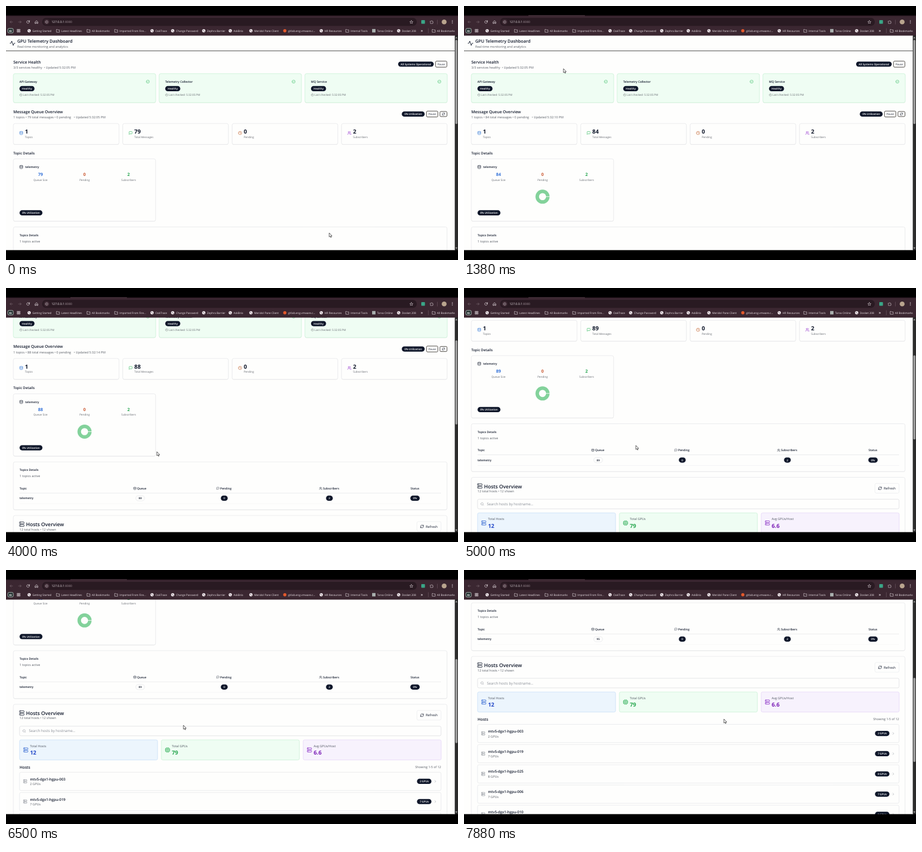
These frames come from a looping animation (800x450 px, 8 s). An HTML page with a canvas:

```html
<!DOCTYPE html>
<html lang="en">
<head>
<meta charset="utf-8">
<title>GPU Telemetry Dashboard</title>
<style>
html, body { margin: 0; width: 100%; height: 100%; overflow: hidden; background: #000; }
canvas { display: block; width: 800px; height: 450px; }
</style>
</head>
<body>
<canvas id="stage"></canvas>
<script>
const LOOP = 8000, STEP = 125;
const INK = '#0f172a', GRAY = '#64686f', LINE = '#e3e4e7', PAGE = '#fefefd';
const BLUE = '#3b7dd8', GREEN = '#2fb95c', ORANGE = '#c2622d', PURPLE = '#9a3fd0';
const SM = 5.56, XS = 4.77, PILL = 4.7, HEAD = 7.05, ITEM = 5.2;

const canvas = document.getElementById('stage');
const ctx = canvas.getContext('2d');
const dpr = window.devicePixelRatio || 1;
canvas.width = 800 * dpr;
canvas.height = 450 * dpr;

// Icons on a 24 unit grid
const slab = y => `M4 ${y}h16a2 2 0 0 1 2 2v4a2 2 0 0 1-2 2H4a2 2 0 0 1-2-2V${y + 2}a2 2 0 0 1 2-2zM6 ${y + 4}h1`;
const ring = 'M2 12a10 10 0 1 0 20 0a10 10 0 1 0-20 0';
const icons = {
  activity: 'M23 12h-4l-4 10L9 2l-4 10H1',
  database: 'M3 5a9 3 0 0 0 18 0a9 3 0 0 0-18 0V19a9 3 0 0 0 18 0V5M3 12a9 3 0 0 0 18 0',
  message: 'M21 15a2 2 0 0 1-2 2H7l-4 4V5a2 2 0 0 1 2-2h14a2 2 0 0 1 2 2z',
  clock: ring + 'M12 6v6l4 2',
  users: 'M16 21v-2a4 4 0 0 0-4-4H6a4 4 0 0 0-4 4v2M5 7a4 4 0 1 0 8 0a4 4 0 1 0-8 0M22 21v-2a4 4 0 0 0-3-3.9M16 3.1a4 4 0 0 1 0 7.8',
  check: ring + 'M8 12l3 3l5-6',
  server: slab(2) + slab(14),
  refresh: 'M3 12a9 9 0 0 1 9-9a9.7 9.7 0 0 1 6.7 2.7L21 8M21 3v5h-5M21 12a9 9 0 0 1-9 9a9.7 9.7 0 0 1-6.7-2.7L3 16M8 16H3v5',
  cpu: 'M4 4h16v16H4zM9 9h6v6H9zM9 1v3M15 1v3M9 20v3M15 20v3M1 9h3M1 15h3M20 9h3M20 15h3',
  search: 'M3 11a8 8 0 1 0 16 0a8 8 0 1 0-16 0M21 21l-4.3-4.3',
  chevron: 'M9 18l6-6l-6-6',
  folder: 'M2 20V4h7l3 3h10v13z',
  grid: 'M3 3h7v7H3zM14 3h7v7h-7zM3 14h7v7H3zM14 14h7v7h-7z',
  back: 'M20 12H4M11 5l-7 7l7 7',
  forward: 'M4 12h16M13 5l7 7l-7 7',
  reload: 'M20 12a8 8 0 1 1-2.5-5.8L21 9M21 3v6h-6',
  home: 'M4 11l8-7l8 7v10h-5v-6H9v6H4z',
  info: ring + 'M12 11v6M12 7v1',
  star: 'M12 2l3 7l7.5.6l-5.7 5l1.8 7.4L12 18l-6.6 4l1.8-7.4l-5.7-5L9 9z',
  puzzle: 'M3 7h6a3 3 0 1 1 6 0h4v5a3 3 0 1 1 0 6v4H3v-5a3 3 0 0 0 0-5z'
};
for (const k in icons) icons[k] = new Path2D(icons[k]);

function icon(name, x, y, size, color, weight = 2) {
  ctx.save();
  ctx.translate(x - size / 2, y - size / 2);
  ctx.scale(size / 24, size / 24);
  ctx.lineWidth = weight;
  ctx.lineCap = ctx.lineJoin = 'round';
  ctx.strokeStyle = color;
  ctx.stroke(icons[name]);
  ctx.restore();
}

// y is the middle of the capitals
function text(s, x, y, size, color = INK, weight = 400, align = 'left') {
  ctx.font = `${weight} ${size}px "Open Sans", "Noto Sans", sans-serif`;
  ctx.textAlign = align;
  ctx.fillStyle = color;
  ctx.fillText(s, x, y + size * 0.357);
}

function rect(x, y, w, h, color) {
  ctx.fillStyle = color;
  ctx.fillRect(x, y, w, h);
}

function box(x0, y0, x1, y1, r, fill, stroke, width = 0.7) {
  ctx.beginPath();
  ctx.roundRect(x0, y0, x1 - x0, y1 - y0, r);
  if (fill) { ctx.fillStyle = fill; ctx.fill(); }
  if (stroke) { ctx.strokeStyle = stroke; ctx.lineWidth = width; ctx.stroke(); }
}

function dot(x, y, r, color) {
  ctx.beginPath();
  ctx.arc(x, y, r, 0, 7);
  ctx.fillStyle = color;
  ctx.fill();
}

function card(x0, y0, x1, y1, fill = PAGE, stroke = LINE) {
  box(x0, y0 + 0.7, x1, y1 + 0.7, 3, 'rgba(0,0,0,.07)');
  box(x0, y0, x1, y1, 3, fill, stroke);
}

function pill(s, x0, x1, y) {
  box(x0, y - 4.6, x1, y + 4.6, 4.6, INK);
  text(s, (x0 + x1) / 2, y, PILL, '#fff', 600, 'center');
}

function button(x0, x1, y, h, label) {
  box(x0, y - h / 2, x1, y + h / 2, 1.8, PAGE, '#39352f', 0.9);
  if (label) text(label, (x0 + x1) / 2, y, 4.6, INK, 500, 'center');
}

// Timeline
const clamp = v => Math.max(0, Math.min(1, v));
const easeOut = p => 1 - (1 - p) ** 3;
const easeInOut = p => p * p * (3 - 2 * p);

const wheelTicks = [3600, 3800, 4450, 4950, 5400, 6380, 7200, 7480];
const scrollAt = t => wheelTicks.reduce((s, k) => s + easeOut(clamp((t - k) / 180)) * 125 / 3, 0);

const polls = [[0, 79, '05'], [900, 84, '10'], [2960, 88, '14'], [4300, 89, '15'], [7500, 95, '20']];
const pollAt = t => polls.filter(p => p[0] <= t).pop();

const path = [
  [130, 572, 402], [1150, 176, 111], [1600, 176, 111], [2550, 775, 191], [2980, 775, 191],
  [3560, 267, 290], [4100, 267, 290], [4900, 304, 279], [5750, 308, 276], [6500, 314, 275],
  [6900, 316, 275], [7800, 460, 264]
];
function pointerAt(t) {
  const i = path.findIndex(k => k[0] > t);
  if (i < 0) return path[path.length - 1].slice(1);
  if (i === 0) return path[0].slice(1);
  const [a, x0, y0] = path[i - 1], [b, x1, y1] = path[i];
  const p = easeInOut((t - a) / (b - a));
  return [x0 + (x1 - x0) * p, y0 + (y1 - y0) * p];
}

// Browser frame
const bookmarks = [
  [41, 'globe', 'Getting Started'], [92, 'folder', 'Latest Headlines'], [146, 'folder', 'All Bookmarks'],
  [195, 'folder', 'Imported From Fire...'], [258.5, 'globe', 'OakTrace'], [295, 'globe', 'Change Password'],
  [350, 'globe', 'Zephra Barrier'], [397, 'globe', 'AskBrio'], [433.5, 'globe', 'Meridol Pane Client'],
  [493.5, '#e2592c', 'gitlab.eng.vmware.c...'], [558, 'globe', 'HR Resources'], [604, 'folder', 'Internal Tools'],
  [651, '#a9b0ae', 'Tarva Online'], [695, 'globe', 'Dosket 208'], [757, 'folder', 'All Bookmarks']
];

function drawBrowser(t, scroll) {
  const light = '#eee6ea', dim = '#84727b';
  rect(0, 0, 800, 17, '#000');
  rect(0, 432.5, 800, 18, '#000');
  rect(0, 17, 800, 35.5, '#3b2731');
  rect(0, 16.5, 800, 1.2, '#21121a');
  if (t >= STEP) rect(114, 16.5, 100, 1, '#5b424e');
  box(64, 21, 727, 35.3, 7, '#291a22');
  icon('back', 9.5, 28.3, 7, dim);
  icon('forward', 24.5, 28.3, 7, dim);
  icon('reload', 39, 28.3, 7, light, 2.4);
  icon('home', 54, 28.3, 7, light, 2.4);
  dot(72, 28.3, 5, '#3b2731');
  icon('info', 72, 28.3, 5.6, light);
  text('127.0.0.1', 80.5, 28.3, 5.4, light);
  text(':8080', 80.5 + ctx.measureText('127.0.0.1').width, 28.3, 5.4, '#9d8d95');
  icon('star', 717.5, 28.3, 6.5, light);
  box(735, 25, 741.5, 31.5, 1, '#3aa587');
  icon('puzzle', 753.5, 28.3, 6.5, light);
  rect(763.3, 24.5, 0.7, 8, '#6a5560');
  dot(775.5, 28.3, 4.3, '#b9a48e');
  for (const d of [-2.3, 0, 2.3]) dot(790, 28.3 + d, 0.7, light);

  box(3.3, 39.7, 12.8, 47.8, 2, '#22302f', '#c9d6d2', 0.8);
  text('AI', 8, 43.8, 4.8, '#fff', 700, 'center');
  icon('grid', 22.5, 43.8, 6.5, light, 2.6);
  for (const [x, kind, label] of bookmarks) {
    if (kind === 'folder') icon('folder', x, 43.8, 6.6, light, 2.2);
    else if (kind === 'globe') {
      dot(x, 43.8, 2.9, '#f2ecef');
      rect(x - 1.4, 42.6, 1.5, 1.2, '#6b5561');
      rect(x + 0.3, 44.2, 1.2, 1.2, '#6b5561');
    } else if (x > 600) box(x - 3, 40.8, x + 3, 46.8, 0, kind);
    else dot(x, 43.8, 2.9, kind);
    text(label, x + 5.8, 43.8, XS, light);
  }
  text('»', 736, 43.4, 7, light, 600, 'center');
  rect(747, 39.5, 0.7, 8.5, '#6a5560');

  rect(794.3, 52.5, 5.7, 380, '#2c2c2c');
  box(795.3, 60 + scroll * 0.393, 799, 209 + scroll * 0.393, 1.9, '#9c9c9c');
  for (const [y, d] of [[57.3, -2.5], [427.8, 2.5]]) {
    ctx.beginPath();
    ctx.moveTo(795.2, y);
    ctx.lineTo(799, y);
    ctx.lineTo(797.1, y + d);
    ctx.fillStyle = '#a5a5a5';
    ctx.fill();
  }
}

// Page sections
function drawHealth() {
  icon('activity', 11.5, 66, 9.6, INK, 2.3);
  text('GPU Telemetry Dashboard', 20, 62.2, 7.7, INK, 600);
  text('Real-time monitoring and analytics', 20, 72, SM, '#555a63');
  rect(0, 79, 794.3, 0.9, '#3a3a3a');

  text('Service Health', 13, 99, HEAD, INK, 600);
  text('3/3 services healthy', 13, 108.8, SM, '#555a63');
  text('• Updated 5:32:05 PM', 67, 108.8, SM, '#555a63');
  pill('All Systems Operational', 694, 757, 103);
  button(760.3, 780.3, 103, 10.6, 'Pause');
  ['API Gateway', 'Telemetry Collector', 'MQ Service'].forEach((name, i) => {
    const x = 13 + i * 258;
    card(x, 119.8, x + 252, 171.2, '#effdf3', '#c3efd1');
    text(name, x + 10.8, 134, ITEM, INK, 600);
    icon('check', x + 238, 134, 6.6, GREEN);
    pill('Healthy', x + 10.8, x + 37.5, 146.4);
    icon('clock', x + 13.3, 157.6, 5, GRAY);
    text('Last checked: 5:32:05 PM', x + 17, 157.6, XS, GRAY);
  });
}

function drawQueue(t, count, sec) {
  text('Message Queue Overview', 13, 187.3, HEAD, INK, 600);
  text(`1 topics • ${count} total messages • 0 pending`, 13, 197.2, SM, '#555a63');
  text(`• Updated 5:32:${sec} PM`, 120, 197.2, SM, '#555a63');
  const loading = t >= 2650 && t < 2960;
  if (loading) pill('Loading...', 710, 741, 191.4);
  else pill('0% Utilization', 700.5, 741, 191.4);
  button(744.3, 764.3, 191.4, 10.4, 'Pause');
  ctx.globalAlpha = loading ? 0.45 : 1;
  button(768, 780.5, 191.4, 9);
  icon('refresh', 774.2, 191.4, 5.4, INK, 2.4);
  ctx.globalAlpha = 1;

  const stats = [
    ['database', BLUE, 1, 'Topics'], ['message', GREEN, count, 'Total Messages'],
    ['clock', ORANGE, 0, 'Pending'], ['users', PURPLE, 2, 'Subscribers']
  ];
  stats.forEach(([name, color, value, label], i) => {
    const x = 13 + i * 193.6;
    card(x, 208.2, x + 187, 245.2);
    icon(name, x + 14, 225, 7, color, 2.2);
    text(value, x + 20.5, 222.6, 10, INK, 700);
    text(label, x + 20.5, 232, XS, GRAY);
  });
}

function drawTopic(t, count) {
  text('Topic Details', 13, 260.6, 6.2, INK, 600);
  card(13, 270.8, 264.8, 381.2);
  icon('database', 27, 285.2, 7, INK);
  text('telemetry', 34, 285.2, ITEM, INK, 600);
  [[count, '#3573d9', 'Queue Size'], [0, '#cb5a33', 'Pending'], [2, '#27a650', 'Subscribers']].forEach(([v, color, label], i) => {
    const x = 61 + i * 78;
    text(v, x, 298.7, 7.6, color, 700, 'center');
    text(label, x, 307.8, XS, GRAY, 400, 'center');
  });
  const sweep = easeInOut(clamp((t - 250) / 1000));
  if (sweep > 0) {
    ctx.beginPath();
    ctx.arc(139, 337.8, 9.4, 0, -2 * Math.PI * sweep, true);
    ctx.strokeStyle = '#83d29b';
    ctx.lineWidth = 6.2;
    ctx.stroke();
    rect(145, 337.3, 7, 0.9, PAGE);
  }
  pill('0% Utilization', 24, 64.5, 366.4);
}

function drawTable(count) {
  card(13, 391.4, 780.6, 476.2);
  text('Topics Details', 24, 405.8, 5.1, INK, 600);
  text('1 topics active', 24, 416.8, SM, '#555a63');
  const heads = [[24, 'Topic'], [232, 'Queue', 'database'], [379, 'Pending', 'message'], [561, 'Subscribers', 'users'], [716, 'Status']];
  for (const [x, label, name] of heads) {
    text(label, x, 438.4, 5.1, INK, 600);
    if (name) icon(name, x - 4, 438.4, 5.4, INK);
  }
  rect(24, 446.2, 746, 0.7, LINE);
  text('telemetry', 24, 455.8, ITEM, INK, 600);
  box(229.6, 451.2, 245.4, 460.4, 4.6, PAGE, LINE);
  text(count, 237.5, 455.8, PILL, INK, 600, 'center');
  pill('0', 380.2, 392.4, 455.8);
  pill('2', 566.4, 578.4, 455.8);
  pill('0%', 715.6, 732.2, 455.8);
  rect(24, 465, 746, 0.6, '#efeff1');
}

const hosts = [['003', 2], ['019', 7], ['025', 8], ['006', 7], ['010', 8]];

function drawHosts() {
  card(13, 486.4, 780.6, 800);
  icon('server', 28, 501.8, 9.6, INK);
  text('Hosts Overview', 35.5, 502.4, 8.95, INK, 600);
  text('12 total hosts • 12 shown', 24, 510.9, SM, '#555a63');
  box(727.3, 497.2, 770, 514.4, 2.5, PAGE, '#e9eaec');
  icon('refresh', 736.3, 505.8, 6.8, INK, 2.3);
  text('Refresh', 743, 505.8, 5.85, INK, 500);
  box(24, 525.2, 770, 542.2, 2.5, PAGE, '#d9dadd');
  icon('search', 32.2, 533.7, 6.4, '#8a8f98');
  text('Search hosts by hostname...', 40.5, 533.7, 6.3, '#858a93');

  const tiles = [
    ['Total Hosts', '12', 'server', '#ecf5fd', '#c2dcf6', '#2d63d0', '#2449c8'],
    ['Total GPUs', '79', 'cpu', '#effdf3', '#c3efd1', '#2fae57', '#2aa851'],
    ['Avg GPUs/Host', '6.6', 'server', '#f7f2fd', '#e2d2f6', '#8a2fc6', '#7c1fb6']
  ];
  tiles.forEach(([label, value, name, fill, edge, tint, ink], i) => {
    const x = 24 + i * 251;
    box(x, 549.4, x + 244.2, 585, 2.5, fill, edge);
    icon(name, x + 11, 567.3, 9, tint, 2.2);
    text(label, x + 18.5, 560.4, SM, '#4d535e');
    text(value, x + 18.5, 572.3, 9.8, ink, 700);
  });

  text('Hosts', 24, 597.8, 6.9, INK, 600);
  text('Showing 1-5 of 12', 770, 597.8, SM, '#555a63', 400, 'right');
  hosts.forEach(([id, gpus], i) => {
    const y = 622.9 + i * 35.83;
    box(24, y - 16.1, 770, y + 16.2, 2.5, PAGE, LINE);
    icon('server', 34, y, 7, '#6f7580');
    text('mtv5-dgx1-hgpu-' + id, 42.5, y - 4, 6.35, INK, 600);
    text(gpus + ' GPUs', 42.5, y + 5, SM, '#555a63');
    pill(gpus + ' GPUs', 727.4, 753, y);
    icon('chevron', 759.8, y, 6.6, '#858a93');
  });
}

const arrow = new Path2D('M0 0V7.2L1.7 5.7L2.8 8.1L3.9 7.6L2.9 5.3H5z');
function drawPointer(x, y) {
  ctx.save();
  ctx.translate(x, y);
  ctx.fillStyle = '#fff';
  ctx.strokeStyle = '#333';
  ctx.lineWidth = 0.8;
  ctx.fill(arrow);
  ctx.stroke(arrow);
  ctx.restore();
}

function draw(t) {
  const scroll = scrollAt(t);
  const [, count, sec] = pollAt(t);
  ctx.setTransform(dpr, 0, 0, dpr, 0, 0);
  ctx.textRendering = 'geometricPrecision';
  rect(0, 0, 800, 450, '#000');
  ctx.save();
  ctx.beginPath();
  ctx.rect(0, 52, 795, 381);
  ctx.clip();
  rect(0, 52, 795, 381, PAGE);
  ctx.translate(0, -scroll);
  drawHealth();
  drawQueue(t, count, sec);
  drawTopic(t, count);
  drawTable(count);
  drawHosts();
  ctx.restore();
  drawBrowser(t, scroll);
  drawPointer(...pointerAt(t));
}

const start = performance.now();
function frame() {
  const t = (performance.now() - start) % LOOP;
  draw(Math.floor(t / STEP) * STEP);
  requestAnimationFrame(frame);
}
frame();
</script>
</body>
</html>
```
